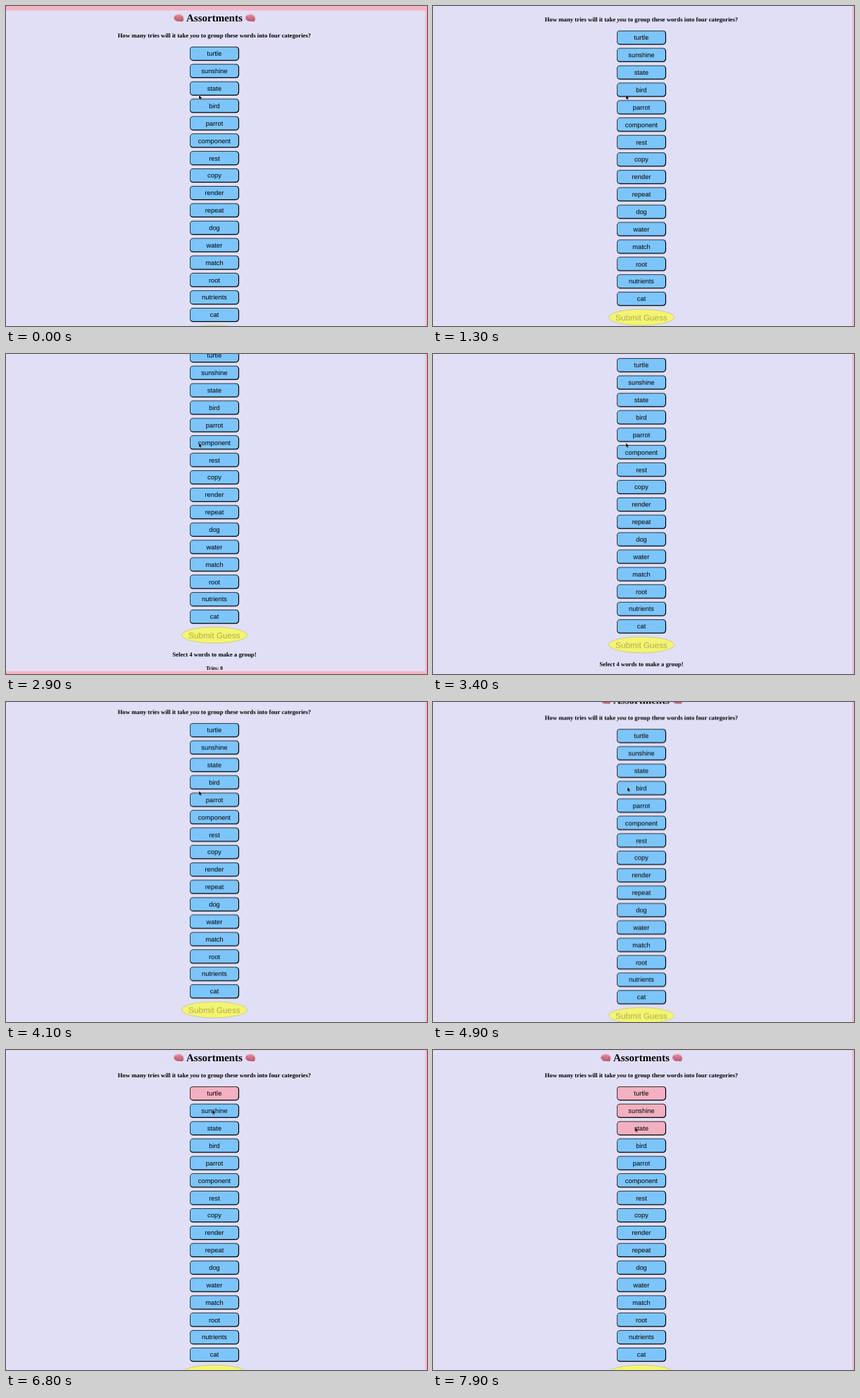
Write an HTML page that moves like this. It is 600x457 px and loops after 8000 ms.

```html
<!DOCTYPE html>
<html lang="en">
<head>
<meta charset="utf-8">
<title>Word groups</title>
<style>
  html, body { margin: 0; width: 100%; height: 100%; overflow: hidden; background: #f6b4c3; }
  svg { display: block; width: 100%; height: 100%; }
  text {
    text-anchor: middle; text-rendering: geometricPrecision; fill: #000;
    font: bold 8.77px "Liberation Serif", Times, serif;
  }
  .title { font-size: 15px; }
  .tries { font-size: 7.5px; }
  .word { font: 9.4px "Liberation Sans", Arial, sans-serif; }
  .submit { font: 11.75px "Liberation Sans", Arial, sans-serif; fill: #adae50; }
</style>
</head>
<body>
<svg viewBox="0 0 600 457" preserveAspectRatio="none">
  <defs>
    <linearGradient id="flesh" x2="0" y2="1">
      <stop stop-color="#f3a3ae"/><stop offset="1" stop-color="#b9566d"/>
    </linearGradient>
    <g id="brain">
      <path d="M1 7C0 3 4 0 8 .6 12 .4 15.5 3 15 8 14 11.5 12 11.5 10 10.5 7 11 3 11 1 7Z" fill="url(#flesh)"/>
      <path d="M2 6Q5 6 4.500 3M5 8.500Q8 8 7 5M8 1.500Q10 3 9 5M10 9Q13 8 12 4" fill="none" stroke="#a2465c" stroke-width=".7"/>
    </g>
  </defs>
  <g id="page">
    <rect y="6.4" width="598" height="512.6" fill="#e1dff6"/>
    <use href="#brain" x="238.3" y="11.2"/>
    <text class="title" x="297" y="21.5">Assortments</text>
    <use href="#brain" x="340.3" y="11.2"/>
    <text x="297" y="44.8">How many tries will it take <tspan font-style="italic">you</tspan> to group these words into four categories?</text>
    <g id="words"></g>
    <ellipse cx="297" cy="467.4" rx="46.6" ry="11.4" fill="#f3f571" stroke="#c3c386" stroke-width=".8"/>
    <text class="submit" x="297" y="471.7">Submit Guess</text>
    <text x="297" y="497.6">Select 4 words to make a group!</text>
    <text class="tries" x="297" y="516.8">Tries: 0</text>
  </g>
  <rect x="597.5" width="2.5" height="457" fill="#ffb5c2"/>
  <path id="cursor" d="M0 0V6.5L1.6 5.2 2.6 7.4 3.6 7 2.6 4.8H4.600Z" stroke="#fff" stroke-opacity=".6" stroke-width=".5"/>
</svg>
<script>
const LOOP = 8000, FRAME = 100;
const SINE = 'cubic-bezier(.37, 0, .63, 1)';
const BLUE = '#7cc5fa', PINK = '#f2b0c1';
const REST = 6; // scroll offset while words are picked
const words = 'turtle sunshine state bird parrot component rest copy render repeat dog water match root nutrients cat'.split(' ');

const wordY = i => 68.1 + i * 24.87;
const clickTime = i => 6200 + i * 650;
const shift = (x, y) => ({ transform: `translate(${x}px, ${y}px)` });
const key = (time, style, easing = SINE) => ({ offset: time / LOOP, easing, ...style });

// Holds the first and last pose to the ends of the loop.
function play(node, keys) {
  const frames = [{ ...keys[0], offset: 0 }, ...keys, { ...keys.at(-1), offset: 1 }];
  node.animate(frames, { duration: LOOP, iterations: Infinity, easing: `steps(${LOOP / FRAME}, end)` });
}

function add(parent, tag, attributes) {
  const node = document.createElementNS('http://www.w3.org/2000/svg', tag);
  for (const name in attributes) node.setAttribute(name, attributes[name]);
  return parent.appendChild(node);
}

const list = document.getElementById('words');
const pointer = [
  key(4800, shift(275, 127)),
  key(5400, shift(306, 43.5)),
  key(5700, shift(306, 43.5)),
];

words.forEach((word, i) => {
  const y = wordY(i);
  add(list, 'rect', { x: 262, y: y - 10.1, width: 70.2, height: 20.2, rx: 4.6 });
  const face = add(list, 'rect', { x: 262.7, y: y - 9.4, width: 68.3, height: 18.3, rx: 4, fill: BLUE });
  add(list, 'text', { class: 'word', x: 297, y: y + 3.2 }).textContent = word;
  if (i > 2) return;

  const click = clickTime(i);
  play(face, [key(click, { fill: BLUE }, 'step-start'), key(click, { fill: PINK })]);
  const spot = shift(300 - i * 6, y - REST - 1.5);
  pointer.push(key(click - 100, spot), key(click + 200, spot));
});

const scrollTo = (time, y) => key(time, shift(0, -y));
play(document.getElementById('page'), [
  scrollTo(800, 0),
  scrollTo(2070, 68.5), scrollTo(2600, 68.5),
  scrollTo(4600, 21), scrollTo(4800, 21),
  scrollTo(5300, REST),
]);
play(document.getElementById('cursor'), pointer);
</script>
</body>
</html>
```
